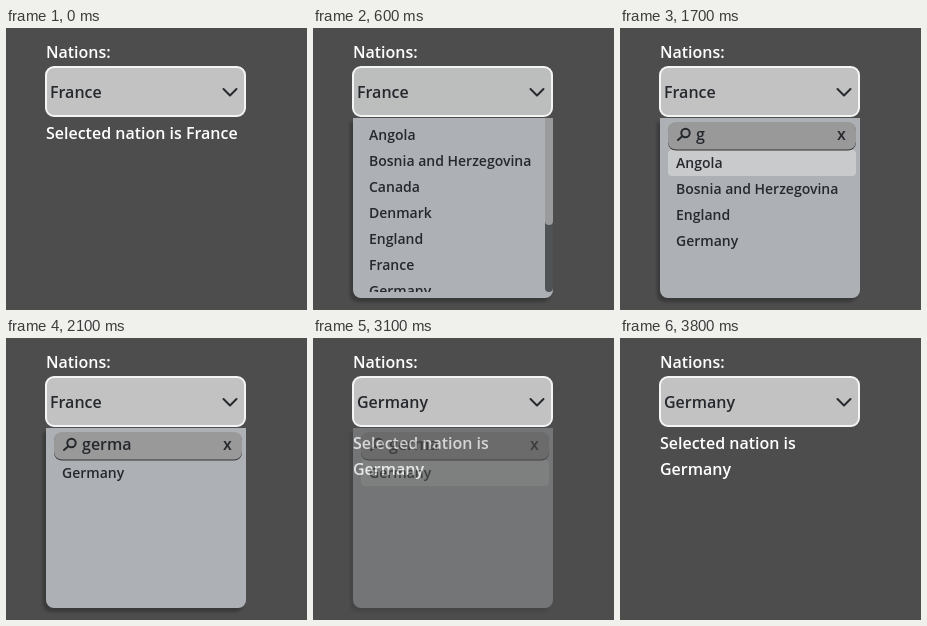
Recreate the animation shown at these times as an HTML page. Size 301 by 282 pixels, loop 4.4 s.

```html
<!DOCTYPE html>
<html lang="en">
<head>
<meta charset="utf-8">
<title>Nation picker</title>
<style>
  html, body { margin: 0; width: 100%; height: 100%; overflow: hidden; background: #4d4d4d; }
  svg { display: block; width: 301px; height: 282px; }
  text { font: 600 16px "Open Sans", "Noto Sans", sans-serif; fill: #25282d; white-space: pre; }
  .label { fill: #fff; }
  .item { font-size: 14px; }
  .line { fill: none; stroke: #25282d; stroke-width: 2; stroke-linecap: round; stroke-linejoin: round; }
  #panel { filter: drop-shadow(-3px 4px 1.5px rgba(0, 0, 0, .25)); }
</style>
</head>
<body>
<svg viewBox="0 0 301 282">
  <defs>
    <clipPath id="view"><rect x="40" y="90" width="200" height="174"/></clipPath>
  </defs>
  <text class="label" x="40" y="30">Nations:</text>
  <text class="label" id="line1" x="40" y="111"></text>
  <text class="label" id="line2" x="40" y="137"></text>

  <rect id="button" x="40" width="199" rx="8" stroke-width="2"/>
  <text id="value" x="44" y="70"></text>
  <path class="line" d="M217.5 61 L224 67.5 L230.500 61"/>

  <g id="fade">
    <path id="panel" d="M40 90 H240 V262 a8 8 0 0 1 -8 8 H48 a8 8 0 0 1 -8 -8 Z" fill="#adb1b6"/>
    <rect id="mark" x="48" height="26" rx="4" fill="#c9cacb"/>
    <g id="scroll">
      <path d="M232 90 H240 V260 a4 4 0 0 1 -8 0 Z" fill="#505356"/>
      <path d="M232 90 H240 V193 a4 4 0 0 1 -8 0 Z" fill="#9a9b9c"/>
    </g>
    <g id="search">
      <rect x="48" y="95" width="188" height="27.500" rx="8" fill="#333"/>
      <rect x="48" y="94" width="188" height="27.500" rx="8" fill="#999"/>
      <circle class="line" cx="65.500" cy="105" r="4.200"/>
      <path class="line" d="M62.300 108.200 L58 112"/>
      <text id="query" x="76" y="112"></text>
      <text x="217" y="112">x</text>
    </g>
    <g id="list" clip-path="url(#view)"></g>
  </g>
</svg>
<script>
  const LOOP = 4400, ROW = 26, OPEN = 600, PICK = 3100, CLOSED = 3200;
  const TYPE_START = 1700, TYPE_STEP = 100, WORD = "germa";
  const nations = ["Angola", "Bosnia and Herzegovina", "Canada", "Denmark", "England", "France", "Germany"];
  const $ = id => document.getElementById(id);
  const show = (el, on) => el.style.display = on ? "" : "none";

  // Button looks: [start time, fill, border, top]
  const looks = [
    [0, "#c2c2c2", "#f4f4f4", 39],
    [100, "#bdbebe", "#ececec", 40],
    [500, "#babcbb", "#ececec", 40],
    [600, "#bcbdbd", "#f4f4f4", 39],
    [800, "#c2c2c2", "#f4f4f4", 39],
    [3700, "#bfc0c0", "#f0f0f0", 39],
    [3800, "#c2c2c2", "#f4f4f4", 39]
  ];

  const rows = nations.map(name => {
    const row = document.createElementNS("http://www.w3.org/2000/svg", "text");
    row.setAttribute("class", "item");
    row.setAttribute("x", 56);
    row.textContent = name;
    return $("list").appendChild(row);
  });

  function drawButton(t) {
    const [, fill, border, top] = looks.filter(look => look[0] <= t).pop();
    const b = $("button");
    b.setAttribute("fill", fill);
    b.setAttribute("stroke", border);
    b.setAttribute("y", top);
    b.setAttribute("height", 88 - top);
  }

  function drawChoice(picked) {
    $("value").textContent = picked ? "Germany" : "France";
    $("line1").textContent = picked ? "Selected nation is" : "Selected nation is France";
    $("line2").textContent = picked ? "Germany" : "";
  }

  function drawPanel(t) {
    show($("fade"), t >= OPEN && t < CLOSED);
    $("fade").setAttribute("opacity", t < PICK ? 1 : 0.4);

    const typed = t < TYPE_START ? 0 : Math.floor((t - TYPE_START) / TYPE_STEP) + 1;
    const query = WORD.slice(0, typed);
    const searching = query !== "";
    const top = searching ? 122 : 94;
    $("query").textContent = query;
    show($("search"), searching);
    show($("scroll"), !searching);

    let n = 0;
    rows.forEach((row, i) => {
      const match = nations[i].toLowerCase().includes(query);
      show(row, match);
      if (match) row.setAttribute("y", top + 18 + ROW * n++);
    });

    // Narrowing the list drops the highlight until the next key press.
    show($("mark"), t >= 800 && (typed < 2 || t >= 2800));
    $("mark").setAttribute("y", top);
    $("mark").setAttribute("width", searching ? 188 : 180);
  }

  const start = performance.now();
  function frame() {
    const t = (performance.now() - start) % LOOP;
    drawButton(t);
    drawChoice(t >= PICK);
    drawPanel(t);
    requestAnimationFrame(frame);
  }
  frame();
</script>
</body>
</html>
```
